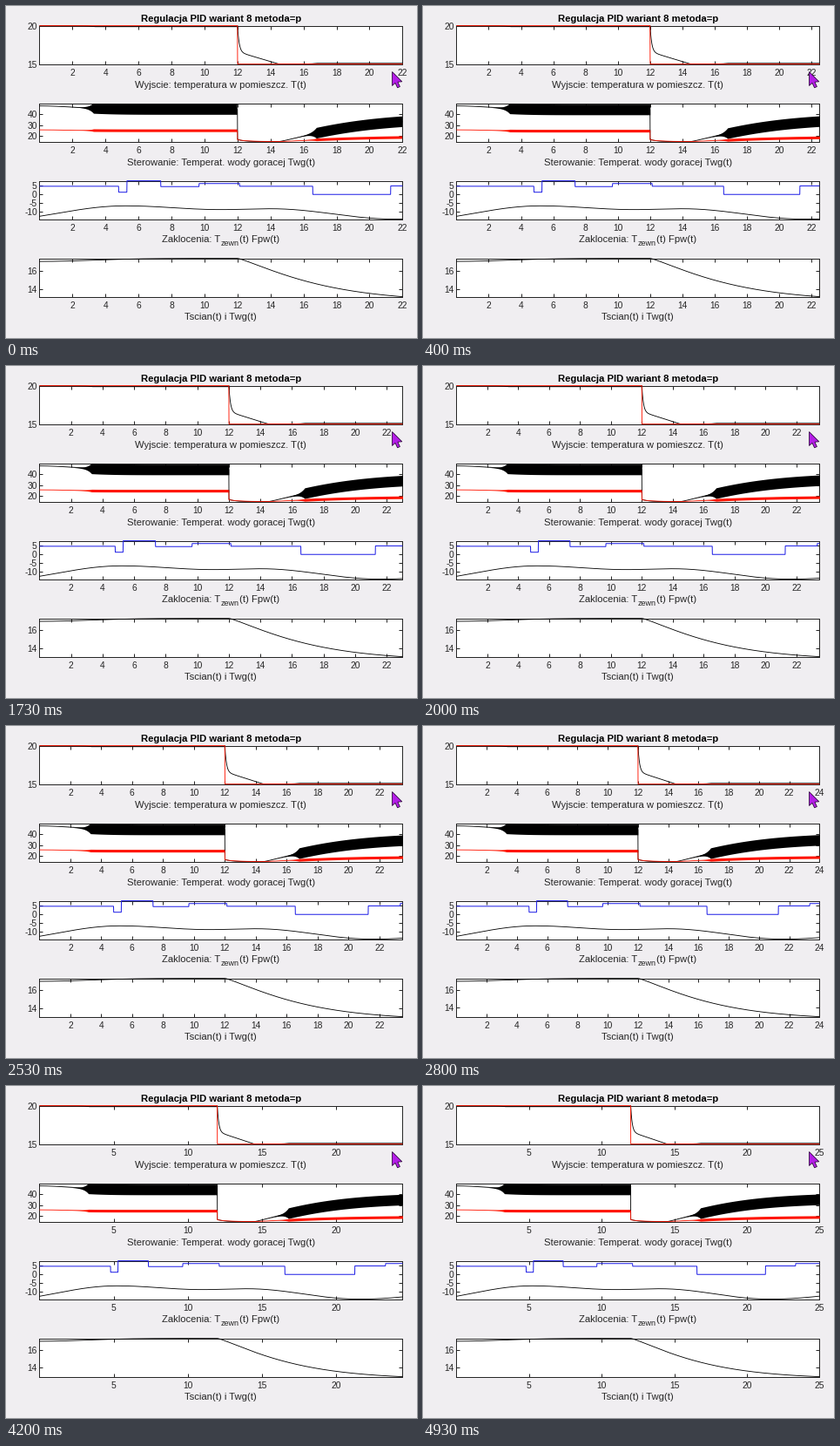
A matplotlib script that plays this animation: 472 px wide and 381 px high, repeating every 4990 ms.

```python
import numpy as np
import matplotlib.pyplot as plt
from matplotlib.animation import FuncAnimation

W, H, DPI = 472, 381, 100
PX = 72 / DPI  # points per pixel
LEFT, RIGHT, TOP, HEIGHT, PITCH = 38.4, 455.4, 22.6, 44, 89
BACK, INK, RED, BLUE = "#f0eef1", "#262626", "#ff1400", "#1e1ee6"
LABEL, TICK = 11.25 * PX, 10.2 * PX
CENTER = (LEFT + RIGHT) / 2 - 0.3
FRAMES = 25
STEP_TIME = 12  # the set point drops here

plt.rcParams.update({"font.family": "Liberation Sans", "axes.linewidth": PX,
                     "axes.unicode_minus": False})
fig = plt.figure(figsize=(W / DPI, H / DPI), dpi=DPI, facecolor=BACK)
t = np.linspace(0, 25, 5001)
since = np.maximum(t - STEP_TIME, 0)
heating = t < STEP_TIME


def settle(elapsed, tau):
    """Rise from 0 to 1 with a soft start."""
    return 1 - np.exp(-(np.maximum(elapsed, 0) / tau) ** 1.2)


def bell(width):
    return np.exp(-(t / width) ** 2)


def ripple(full):
    """Oscillation that grows exponentially until it saturates."""
    return np.minimum(1, np.exp((t - full) / 0.3))


def swing(points):
    """Cosine easing from one turning point to the next."""
    x, y = np.array(points, float).T
    i = np.searchsorted(x, t, "right") - 1
    u = (t - x[i]) / (x[i + 1] - x[i])
    return y[i] + (y[i + 1] - y[i]) * (1 - np.cos(np.pi * u)) / 2


def write(x, baseline, text, ha="center", size=LABEL, color=INK, **kw):
    fig.text(x / W, 1 - baseline / H, text, ha=ha, va="baseline",
             fontsize=size, color=color, **kw)


def panel(row, ylim, yticks):
    bottom = TOP + PITCH * row + HEIGHT
    ax = fig.add_axes([LEFT / W, 1 - bottom / H, (RIGHT - LEFT) / W, HEIGHT / H])
    ax.set_ylim(*ylim)
    ax.set_yticks(yticks)
    ax.tick_params(direction="in", top=True, right=True, length=4 * PX, width=PX,
                   color=INK, labelcolor=INK, labelsize=TICK)
    ax.tick_params(axis="x", pad=5.5 * PX)
    ax.tick_params(axis="y", pad=2.6 * PX)
    for spine in ax.spines.values():
        spine.set_color(INK)
    return ax


curves = []


def curve(ax, values, color="black", width=0.85):
    line, = ax.plot([], [], color=color, lw=width * PX, zorder=3, clip_on=False,
                    solid_joinstyle="miter", solid_capstyle="butt")
    curves.append((line, values))


def band(ax, middle, half, color):
    ax.fill_between(t, middle - half, middle + half, color=color, lw=0, zorder=2.8)
    curve(ax, middle, color)


room = panel(0, (15, 20), [15, 20])
water = panel(1, (15, 49.6), [20, 30, 40])
weather = panel(2, (-14.5, 8), [-10, -5, 0, 5])
wall = panel(3, (13, 17.33), [14, 16])
panels = [room, water, weather, wall]

# Room temperature and set point
shake = np.where(heating, ripple(3.3), ripple(16.8))
cooling = 15 + 3.4 * np.exp(-since / 0.1) + 1.6 * np.maximum(1 - since / 2.5, 0)
curve(room, np.where(heating, 20 - 0.13 * shake, cooling + 0.1 * shake))
curve(room, np.where(heating, 20, 15), RED, 0.9)

# Supply and return water, both breaking into oscillation
rise = settle(t - 14.5, 4.6)
supply = np.where(heating, 44 + 3.2 * bell(3), 15 + 2 * np.exp(-since / 0.4) + 21.5 * rise)
back = np.where(heating, 24.8 + 0.8 * bell(2.5), 15 + 1.6 * np.exp(-since / 0.7) + 4.4 * rise)
band(water, supply, 4.8 * shake, "black")
band(water, back, 1.2 * shake, RED)

# Disturbances: switched gains and outdoor temperature
switches = [(0, 4.8), (4.8, 1.3), (5.3, 8), (7.35, 4.6), (9.67, 6.4),
            (12.13, 4.8), (16.56, 0), (21.28, 5), (23.35, 6.4)]
gains = sum((t >= start) * (level - before) for (start, level), (_, before)
            in zip(switches, [(0, 0)] + switches))
curve(weather, gains, BLUE, 1)
curve(weather, swing([(-3, -15.4), (5.2, -6.7), (11, -8.9), (14, -8.4),
                      (21.6, -14.5), (30, -9.5)]))

# Wall temperature
walls = 17.33 - 0.33 * bell(4.5) - 4.65 * settle(since, 5.28)
curve(wall, walls)

write(CENTER + 0.4, 18, "Regulacja PID wariant 8 metoda=p", color="black", weight="bold")
captions = ["Wyjscie: temperatura w pomieszcz. T(t)",
            "Sterowanie: Temperat. wody goracej Twg(t)",
            None,
            "Tscian(t) i Twg(t)"]
baselines = [94 + 88.7 * row for row in range(4)]
for caption, baseline in zip(captions, baselines):
    if caption:
        write(CENTER, baseline, caption)
write(CENTER - 0.5, baselines[2], "Zaklocenia: T", "right")
write(CENTER - 0.3, baselines[2] + 4, "zewn", "left", 0.8 * LABEL)
write(CENTER + 21, baselines[2], "(t) Fpw(t)", "left")

# Mouse pointer
outline = np.array([(443.5, 75.5), (443.5, 91.5), (447, 88.3), (449.6, 93.8),
                    (452.4, 92.5), (449.9, 87.2), (454.8, 86.8)])
fig.add_artist(plt.Polygon(np.column_stack([outline[:, 0] / W, 1 - outline[:, 1] / H]),
                           transform=fig.transFigure, facecolor="#b41ee6",
                           edgecolor="#2c0a3c", lw=0.8 * PX, zorder=10))


def update(frame):
    end = 22 + 0.5 * ((frame + 2) // 4)
    shown = t <= end + 1e-9
    for line, values in curves:
        line.set_data(t[shown], values[shown])
    step = 2 if end <= 24 else 5
    for ax in panels:
        ax.set_xlim(0, end)
        ax.set_xticks(np.arange(step, end + 0.01, step))
    wall.set_ylim(walls[shown].min(), walls.max())
    return [line for line, _ in curves]


anim = FuncAnimation(fig, update, frames=FRAMES, interval=4990 / FRAMES,
                     repeat=True, repeat_delay=0, blit=False)
plt.show()
```
